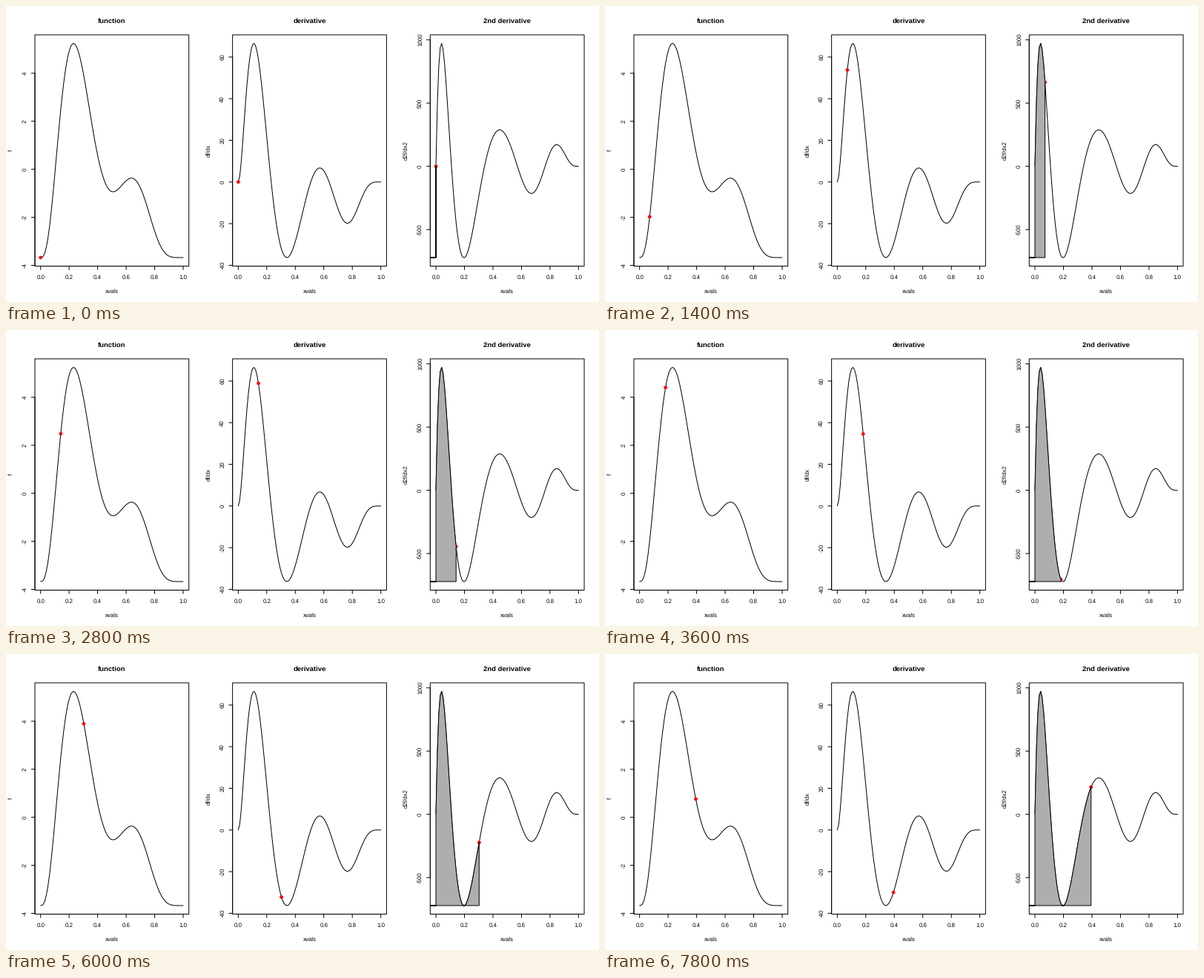
Animation of 800x400 px, one loop 8000 ms. Source, as a matplotlib script:

```python
import matplotlib.pyplot as plt
import numpy as np
from matplotlib.animation import FuncAnimation
from matplotlib.patches import Circle, Polygon, Rectangle

plt.rcParams["font.family"] = "Liberation Sans"
plt.rcParams["text.hinting"] = "none"

W, H, DPI = 800, 400, 100
PT = 72 / DPI                 # points per pixel
FRAMES, STEP_MS = 40, 200
LINE = 9.504                  # height of one margin line
TEXT = 7.92                   # label size in pixels
TOP, BOTTOM = 4.1 * LINE, H - 5.1 * LINE
PAD = 0.04                    # axis range extends past the data by this share
OFFSET = 3.675

TERMS = [(2e5, 11, 6), (1e4, 3, 10)]     # c * x^m * (1-x)^n

x = np.linspace(0, 1, 100)


def curve(x):
    return sum(c * x**m * (1 - x)**n for c, m, n in TERMS) - OFFSET


def slope(x):
    q = 1 - x
    return sum(c * (m * x**(m - 1) * q**n - n * x**m * q**(n - 1))
               for c, m, n in TERMS)


def bend(x):
    q = 1 - x
    return sum(c * (m * (m - 1) * x**(m - 2) * q**n
                    - 2 * m * n * x**(m - 1) * q**(n - 1)
                    + n * (n - 1) * x**m * q**(n - 2))
               for c, m, n in TERMS)


fig = plt.figure(figsize=(W / DPI, H / DPI), dpi=DPI, facecolor="white")
ax = fig.add_axes([0, 0, 1, 1])
ax.set_xlim(0, W)
ax.set_ylim(H, 0)
ax.axis("off")


def stroke(xs, ys):
    ax.plot(xs, ys, color="black", lw=PT, snap=False,
            solid_capstyle="round", solid_joinstyle="round", zorder=2)


def label(px, py, text, size=TEXT, **kw):
    ax.text(px, py, text, fontsize=size * PT, ha="center", va="baseline",
            rotation_mode="anchor", **kw)


class Panel:
    def __init__(self, index, title, ylabel, func, yticks):
        self.left = index * W / 3 + 4.1 * LINE
        self.right = (index + 1) * W / 3 - 2.1 * LINE
        self.y = func(x)
        self.low, self.high = self.y.min(), self.y.max()
        self.draw_frame(title, ylabel, yticks)
        stroke(self.px(x), self.py(self.y))
        self.dot = Circle((0, 0), 2.36, fc="red", ec="none", zorder=3)
        ax.add_patch(self.dot)

    def px(self, v):
        return self.left + (self.right - self.left) * (v + PAD) / (1 + 2 * PAD)

    def py(self, v):
        share = (v - self.low) / (self.high - self.low)
        return BOTTOM - (BOTTOM - TOP) * (share + PAD) / (1 + 2 * PAD)

    def draw_frame(self, title, ylabel, yticks):
        left, right = self.left, self.right
        mid_x, mid_y = (left + right) / 2, (TOP + BOTTOM) / 2
        ax.add_patch(Rectangle((left, TOP), right - left, BOTTOM - TOP,
                               fill=False, ec="black", lw=PT, snap=False))
        xticks = np.arange(6) / 5
        stroke(self.px(xticks[[0, -1]]), [BOTTOM] * 2)
        for t in xticks:
            p = self.px(t)
            stroke([p, p], [BOTTOM, BOTTOM + LINE / 2])
            label(p, BOTTOM + 1.8 * LINE, f"{t:.1f}")
        stroke([left] * 2, [self.py(yticks[0]), self.py(yticks[-1])])
        for t in yticks:
            p = self.py(t)
            stroke([left, left - LINE / 2], [p, p])
            label(left - 1.2 * LINE, p, str(t), rotation=90)
        label(mid_x, BOTTOM + 3.8 * LINE, "xvals")
        label(left - 3.2 * LINE, mid_y, ylabel, rotation=90)
        label(mid_x, 22.9, title, size=1.2 * TEXT, weight="bold")

    def move(self, k):
        self.dot.center = self.px(x[k]), self.py(self.y[k])


panels = [
    Panel(0, "function", "f", curve, range(-4, 5, 2)),
    Panel(1, "derivative", "df/dx", slope, range(-40, 61, 20)),
    Panel(2, "2nd derivative", "d2f/dx2", bend, range(-500, 1001, 500)),
]

area = Polygon([(0, 0)] * 3, closed=True, fc="#aeaeae", ec="black", lw=PT,
               joinstyle="round", snap=False, zorder=4)
ax.add_patch(area)


def update(k):
    for panel in panels:
        panel.move(k)
    last = panels[-1]
    xs = np.concatenate([[-PAD, 0], x[:k + 1], [x[k]]])
    ys = np.concatenate([[last.low] * 2, last.y[:k + 1], [last.low]])
    area.set_xy(np.column_stack([last.px(xs), last.py(ys)]))
    return [area] + [p.dot for p in panels]


anim = FuncAnimation(fig, update, frames=FRAMES, interval=STEP_MS,
                     init_func=lambda: update(0), repeat=True,
                     repeat_delay=0, blit=False)
plt.show()
```
